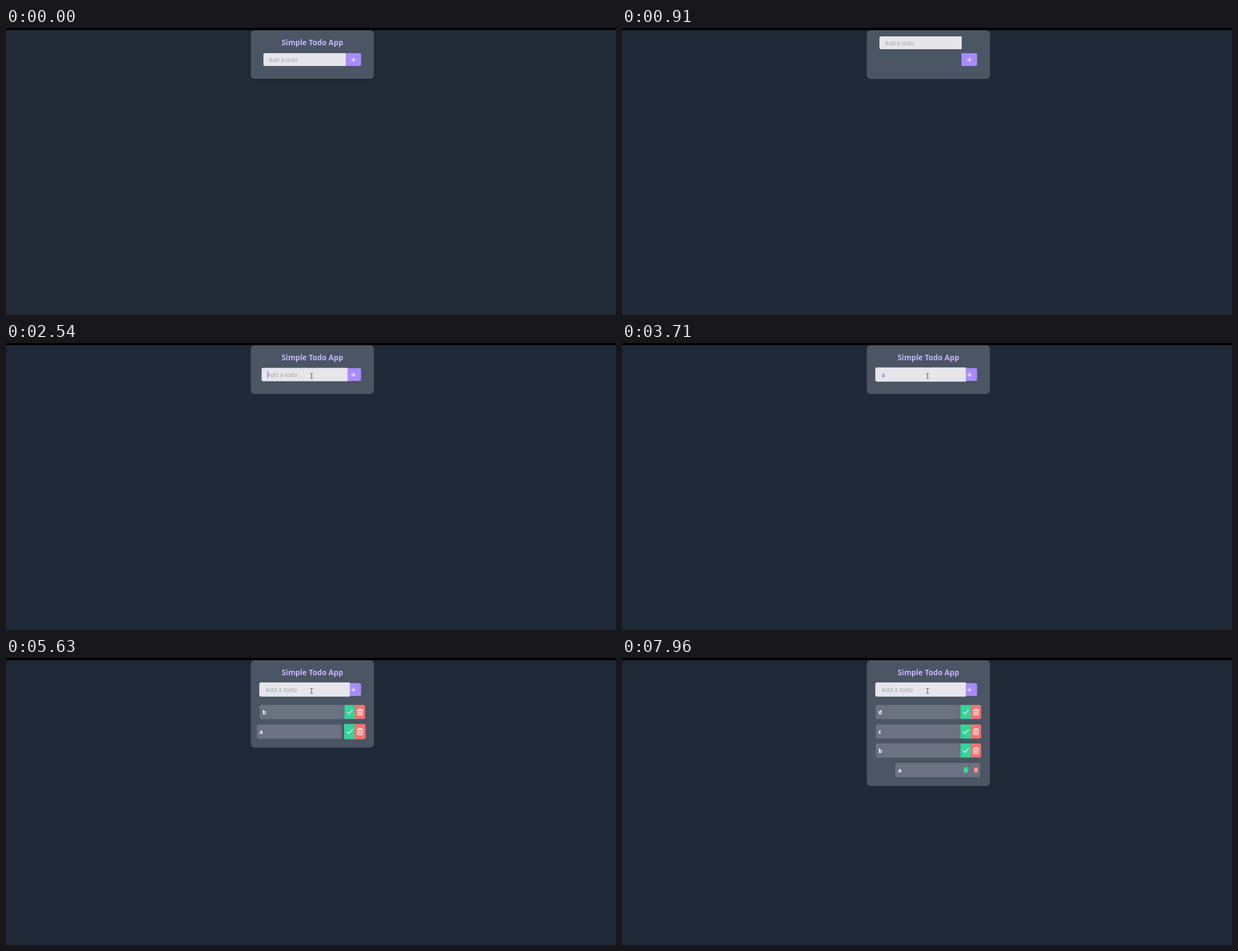
An HTML page with a canvas that plays this animation: 1090 by 514 pixels, repeating every 8 s.

```html
<!DOCTYPE html>
<html lang="en">
<head>
<meta charset="utf-8">
<title>Simple Todo App</title>
<style>
html, body { margin: 0; width: 100%; height: 100%; overflow: hidden; background: #1f2937; }
canvas { display: block; width: 1090px; height: 514px; }
</style>
</head>
<body>
<canvas id="stage" width="1090" height="514"></canvas>
<script>
const ctx = document.getElementById('stage').getContext('2d');
const FONT = '"Noto Sans", "Open Sans", sans-serif';
const LOOP = 8000;
const BLANK = 580, LOAD = 898, POINTER = 1740, FOCUS = 2200, GROW = 2480;
const TICK = 77.47;        // screen refresh interval, in step with LOAD
const BLINK = 516;         // caret half period
const SLIDE_DELAY = 197;   // pause before a new row slides in

const TODOS = [
  { text: 'a', typed: 3130, added: 3750 },
  { text: 'b', typed: 4990, added: 5220 },
  { text: 'c', typed: 6150, added: 6460 },
  { text: 'd', typed: 7390, added: 7700 }
];

const clamp = v => Math.min(1, Math.max(0, v));
const snap = ms => LOAD + Math.floor((ms - LOAD) / TICK) * TICK;

// Damped spring from 1 to 0: stiffness 500, damping 25, mass 1.
function spring(ms) {
  const s = Math.max(0, ms) / 1000, d = 12.5, w = Math.sqrt(500 - d * d);
  return Math.exp(-d * s) * (Math.cos(w * s) + d / w * Math.sin(w * s));
}

function box(x, y, w, h, radii, fill) {
  ctx.fillStyle = fill;
  ctx.beginPath();
  ctx.roundRect(x, y, w, h, radii);
  ctx.fill();
}

function text(str, x, y, font, fill, align = 'left') {
  ctx.font = font + ' ' + FONT;
  ctx.textAlign = align;
  ctx.fillStyle = fill;
  ctx.fillText(str, x, y);
}

function stroke(path, color = '#fff', width = 1.2) {
  ctx.strokeStyle = color;
  ctx.lineWidth = width;
  ctx.lineCap = ctx.lineJoin = 'round';
  ctx.stroke(new Path2D(path));
}

function scaled(cx, cy, k, draw) {
  ctx.save();
  ctx.translate(cx, cy);
  ctx.scale(k, k);
  draw();
  ctx.restore();
}

function checkButton() {
  box(-9.4, -12.6, 18.8, 25.2, 0, '#34d399');
  stroke('M-4.6 .6 L-1.7 3.4 L4.6 -3.4');
}

function trashButton() {
  box(-9, -12.6, 18, 25.2, [0, 3, 3, 0], '#f87171');
  stroke('M-4.8 -3.3 H4.8 M-3.8 -3.3 V5.2 H3.8 V-3.3 M-2.2 -3.3 V-5.4 H2.2 V-3.3');
  stroke('M-1.2 -.8 V2.7 M1.2 -.8 V2.7');
}

function drawRow(label, index, away) {
  const x = 453.5 + 58 * away, y = Math.round(84.4 + index * 34.4);
  box(x, y, 151.5, 25.4, [3, 0, 0, 3], '#6b7280');
  text(label, x + 4.8, y + 16.9, '700 10px', '#fff');
  const k = Math.max(0, 1 - away);
  scaled(614.4, y + 12.7, k, checkButton);
  scaled(632.6, y + 12.7, k, trashButton);
}

function caretVisible(t) {
  const reset = TODOS.reduce((r, d) => t >= d.typed ? d.typed : r, FOCUS);
  return t >= FOCUS && Math.floor((t - reset) / BLINK) % 2 === 0;
}

function drawInput(t, dy) {
  const typing = TODOS.find(d => t >= d.typed && t < d.added);
  const label = typing ? typing.text : 'Add a todo';
  scaled(533.5, 56.5 + dy, 1 + 0.1 * clamp((t - GROW) / 100), () => {
    box(-73.5, -11.5, 147, 23, [3, 0, 0, 3], '#e6e5eb');
    text(label, -63.5, 4, '400 10px', typing ? '#7048d8' : '#9ca3af');
    if (!caretVisible(t)) return;
    const w = typing ? ctx.measureText(label).width : 0;
    ctx.fillStyle = '#7c3aed';
    ctx.fillRect(-63.5 + w, -6.2, 0.9, 12.6);
  });
}

function drawPointer(t) {
  if (t < POINTER) return;
  const p = clamp((t - POINTER) / 320), e = 1 - (1 - p) ** 2;
  const x = t < FOCUS ? 309 + 232 * e : 546;
  const y = t < FOCUS ? 87 - 29 * e : 59;
  ctx.save();
  ctx.translate(x, y);
  if (x > 460 && y < 68) {
    stroke('M-2 -4 H2 M0 -4 V4 M-2 4 H2', '#444', 0.9);
  } else {
    const arrow = 'M0 0 V10.5 L2.5 8 L4.5 12 L6 11 L4 7.5 H7.5 Z';
    ctx.fillStyle = '#fff';
    ctx.fill(new Path2D(arrow));
    stroke(arrow, '#111', 0.7);
  }
  ctx.restore();
}

function drawCard(rows, shadow) {
  ctx.save();
  if (shadow) {
    ctx.shadowColor = 'rgba(0,0,0,0.22)';
    ctx.shadowBlur = 5;
    ctx.shadowOffsetY = 2;
  }
  box(437.5, 4, 220, 87.2 + rows * 34.5, 6.5, '#4b5563');
  ctx.restore();
  text('Simple Todo App', 547.5, 30.7, '700 13.4px', '#c4b5fd', 'center');
  box(606.5, 45, 28, 23, [0, 3, 3, 0], '#a78bfa');
  stroke('M617 56.8 H624.6 M620.8 53 V60.6');
}

function draw(t) {
  const before = t < BLANK, blank = !before && t < LOAD;
  ctx.fillStyle = blank ? '#fff' : before ? '#212b38' : '#1f2937';
  ctx.fillRect(0, 0, 1090, 514);
  ctx.fillStyle = '#000';
  ctx.fillRect(0, 0, 1090, 4);
  if (blank) return;

  const rows = TODOS.filter(d => t >= d.added).reverse();
  drawCard(rows.length, before);
  const drop = before ? 0 : (1 - clamp((t - LOAD) / 780)) ** 3;
  drawInput(t, -30 * drop);

  // New items go on top; the lowest row is the one that slides in.
  rows.forEach((d, i) => {
    const lowest = i === rows.length - 1;
    drawRow(d.text, i, lowest ? spring(t - rows[0].added - SLIDE_DELAY) : 0);
  });
  drawPointer(t);
}

const start = performance.now();
function frame() {
  draw(snap((performance.now() - start) % LOOP));
  requestAnimationFrame(frame);
}
frame();
</script>
</body>
</html>
```
